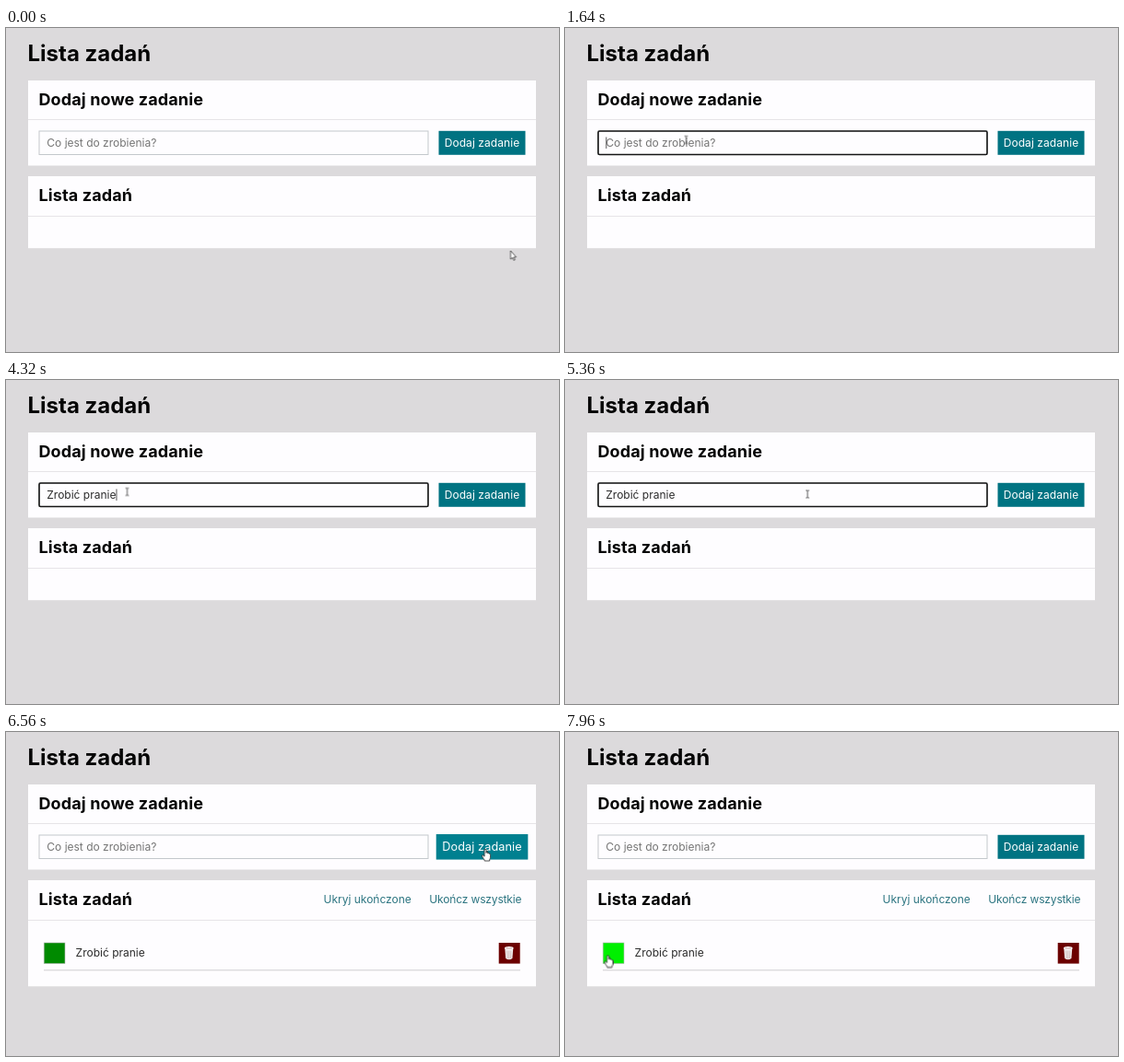
Animation, 600 px wide and 352 px high, one loop 8000 ms. Source, as an HTML page:

```html
<!DOCTYPE html>
<html lang="pl">
<head>
<meta charset="utf-8">
<title>Lista zadań</title>
<style>
html, body { margin: 0; width: 100%; height: 100%; overflow: hidden; background: #dcdadc; }
svg { display: block; width: 100vw; height: 100vh; }
text { font: 400 12px Inter, "Open Sans", sans-serif; font-optical-sizing: none; fill: #2b2b2b; white-space: pre; }
.h1, .h2 { font-weight: 700; fill: #050505; }
.h1 { font-size: 24px; }
.h2 { font-size: 18px; letter-spacing: .12px; }
.panel { fill: #fefdff; }
.rule { stroke: #e6e4e7; }
.link { fill: #2b7480; }
.hint { fill: #757575; }

/* one loop is 8 s, so 1% is 80 ms */
.step { animation: 8s step-end infinite; }
.focus { animation-name: focus; }
.hint { animation-name: hint; }
.added { animation-name: added; }
.arrow { animation-name: arrow; }
.beam { animation-name: beam; }
.hand { animation-name: hand; }
@keyframes focus { 0% { opacity: 0 } 19.5% { opacity: 1 } 79%, 100% { opacity: 0 } }
@keyframes hint { 0% { opacity: 1 } 29.8% { opacity: 0 } 79%, 100% { opacity: 1 } }
@keyframes added { 0% { opacity: 0 } 79%, 100% { opacity: 1 } }
@keyframes arrow { 0% { opacity: 1 } 16% { opacity: 0 } 70.5% { opacity: 1 } 71% { opacity: 0 } 87.5% { opacity: 1 } 90.3%, 100% { opacity: 0 } }
@keyframes beam { 0% { opacity: 0 } 16% { opacity: 1 } 70.5%, 100% { opacity: 0 } }
@keyframes hand { 0% { opacity: 0 } 71% { opacity: 1 } 87.5% { opacity: 0 } 90.3%, 100% { opacity: 1 } }

.button { transform-origin: 516.5px 124.8px; animation: grow 8s infinite; }
.button rect { fill: #007382; animation: tint 8s infinite; }
.button text { fill: #fff; letter-spacing: .08px; }
@keyframes grow {
  0%, 71.2% { transform: scale(1) }
  76%, 88.2% { transform: scale(1.06) }
  94%, 100% { transform: scale(1) }
}
@keyframes tint {
  0%, 71.2% { fill: #007382 }
  76%, 88.2% { fill: #008090 }
  94%, 100% { fill: #007382 }
}
.tick { fill: #008a00; stroke: #b5b5b5; stroke-width: .6; animation: lit 8s infinite; }
@keyframes lit { 0%, 90.6% { fill: #008a00 } 98.5%, 100% { fill: #00f000 } }

.pointer { animation: move 8s linear infinite; }
@keyframes move {
  0% { transform: translate(547.5px, 242px) }
  3.5% { transform: translate(547.5px, 242px); animation-timing-function: cubic-bezier(.4, .1, .65, .9) }
  13.5% { transform: translate(191px, 176px); animation-timing-function: cubic-bezier(.3, .3, .5, 1) }
  19% { transform: translate(131.5px, 121.5px) }
  59% { transform: translate(131.5px, 121.5px); animation-timing-function: cubic-bezier(.5, .1, .8, .6) }
  67% { transform: translate(262.5px, 124px) }
  69.5% { transform: translate(396px, 127px); animation-timing-function: cubic-bezier(.2, .4, .5, 1) }
  74% { transform: translate(521px, 126px) }
  77% { transform: translate(523px, 125.5px) }
  80% { transform: translate(523px, 126.5px) }
  85.5% { transform: translate(515px, 128px); animation-timing-function: ease-in }
  87.5% { transform: translate(455px, 143px) }
  88.5% { transform: translate(277.5px, 188px) }
  89.5% { transform: translate(140px, 222px) }
  90.5% { transform: translate(60px, 240px); animation-timing-function: ease-out }
  95%, 100% { transform: translate(46.5px, 242.5px) }
}
</style>
</head>
<body>
<svg viewBox="0 0 600 352">
  <rect width="600" height="352" fill="#dcdadc"/>
  <text class="h1" x="23.5" y="36.3">Lista zadań</text>

  <rect class="panel" x="24" y="57" width="551" height="92.5"/>
  <path class="rule" d="M24 99.5H575"/>
  <text class="h2" x="35.5" y="84.3">Dodaj nowe zadanie</text>
  <rect x="36" y="112" width="422" height="25.5" fill="#fefdff" stroke="#c3c8cc"/>
  <rect class="step focus" x="36" y="112" width="422" height="25.5" rx="1.5" fill="none" stroke="#151515" stroke-width="1.6"/>
  <text class="step hint" x="44.3" y="129">Co jest do zrobienia?</text>
  <text id="typed" x="44.3" y="129"></text>
  <path id="caret" d="M.5 118.5V131" stroke="#444" stroke-width=".9"/>
  <g class="button">
    <rect x="469.5" y="111.8" width="94" height="26"/>
    <text x="516.5" y="129" text-anchor="middle">Dodaj zadanie</text>
  </g>

  <rect class="panel" x="24" y="161" width="551" height="78.2"/>
  <path class="rule" d="M24 204.5H575"/>
  <text class="h2" x="35.5" y="188.3">Lista zadań</text>

  <g class="step added">
    <rect class="panel" x="24" y="238" width="551" height="38.3"/>
    <text class="link" x="344.5" y="186.2">Ukryj ukończone</text>
    <text class="link" x="459.3" y="186.2" letter-spacing="-.15">Ukończ wszystkie</text>
    <rect class="tick" x="41.2" y="229" width="22.8" height="22.6"/>
    <text x="75.6" y="244.2">Zrobić pranie</text>
    <rect x="534.7" y="229" width="23" height="22.6" fill="#6b0000"/>
    <path d="M541.3 235 542.2 246Q545.8 248.4 549.4 246L550.3 235Z" fill="#f1eeee"/>
    <path d="M543.7 237.5 544 246M545.8 237.5V246.5M547.9 237.5 547.6 246" stroke="#b99" stroke-width=".6"/>
    <ellipse cx="545.8" cy="234.8" rx="4.8" ry="1.7" fill="#fff"/>
    <path d="M542.5 235H549.1" stroke="#a77" stroke-width=".7"/>
    <path d="M41 258.8H558" stroke="#cfcdd0"/>
  </g>

  <g class="pointer" stroke-linejoin="round">
    <path class="step arrow" d="M0 0V9.2L2.1 7.4 3.4 10.4 4.8 9.8 3.5 6.9H6.1Z" fill="#fff" stroke="#333" stroke-width=".8"/>
    <path class="step beam" d="M-1.8-4H-.4L0-3.6 .4-4H1.8M0-3.6V3.6M-1.8 4H-.4L0 3.6 .4 4H1.8" fill="none" stroke="#444" stroke-width=".9"/>
    <path class="step hand" d="M-1 .8Q0-.6 1 .8V4.4Q2-.0 2.6 4.7 3.8 4 4.1 5.2 5.3 4.7 5.5 6.2V9.2Q5.3 10.6 4.6 11.5V13H-.9V12Q-2.6 10.2-3.6 7.9-3.8 6.3-2.4 6.8L-1 8.2Z" fill="#fff" stroke="#222" stroke-width=".8"/>
  </g>
</svg>
<script>
const LOOP = 8000, BLINK = 530, FOCUS = 1560, SUBMIT = 6320;
const phrase = 'Zrobić pranie';
const keys = [2385, 2745, 2905, 2990, 3100, 3345, 3505, 3670, 3790, 3905, 4105, 4200, 4305];
const typed = document.getElementById('typed');
const caret = document.getElementById('caret');
let start;

function draw(now) {
  start ??= now;
  const t = (now - start) % LOOP;
  const active = t >= FOCUS && t < SUBMIT;
  const count = active ? keys.filter(k => k <= t).length : 0;
  const text = phrase.slice(0, count);
  if (typed.textContent !== text) typed.textContent = text;

  // the blink restarts with every key
  const since = t - (count ? keys[count - 1] : FOCUS + 30);
  const lit = active && since >= 0 && since % (2 * BLINK) < BLINK;
  const width = count ? typed.getComputedTextLength() : 0;
  caret.setAttribute('transform', `translate(${44.3 + width} 0)`);
  caret.setAttribute('opacity', lit ? 1 : 0);
  requestAnimationFrame(draw);
}
requestAnimationFrame(draw);
</script>
</body>
</html>
```
